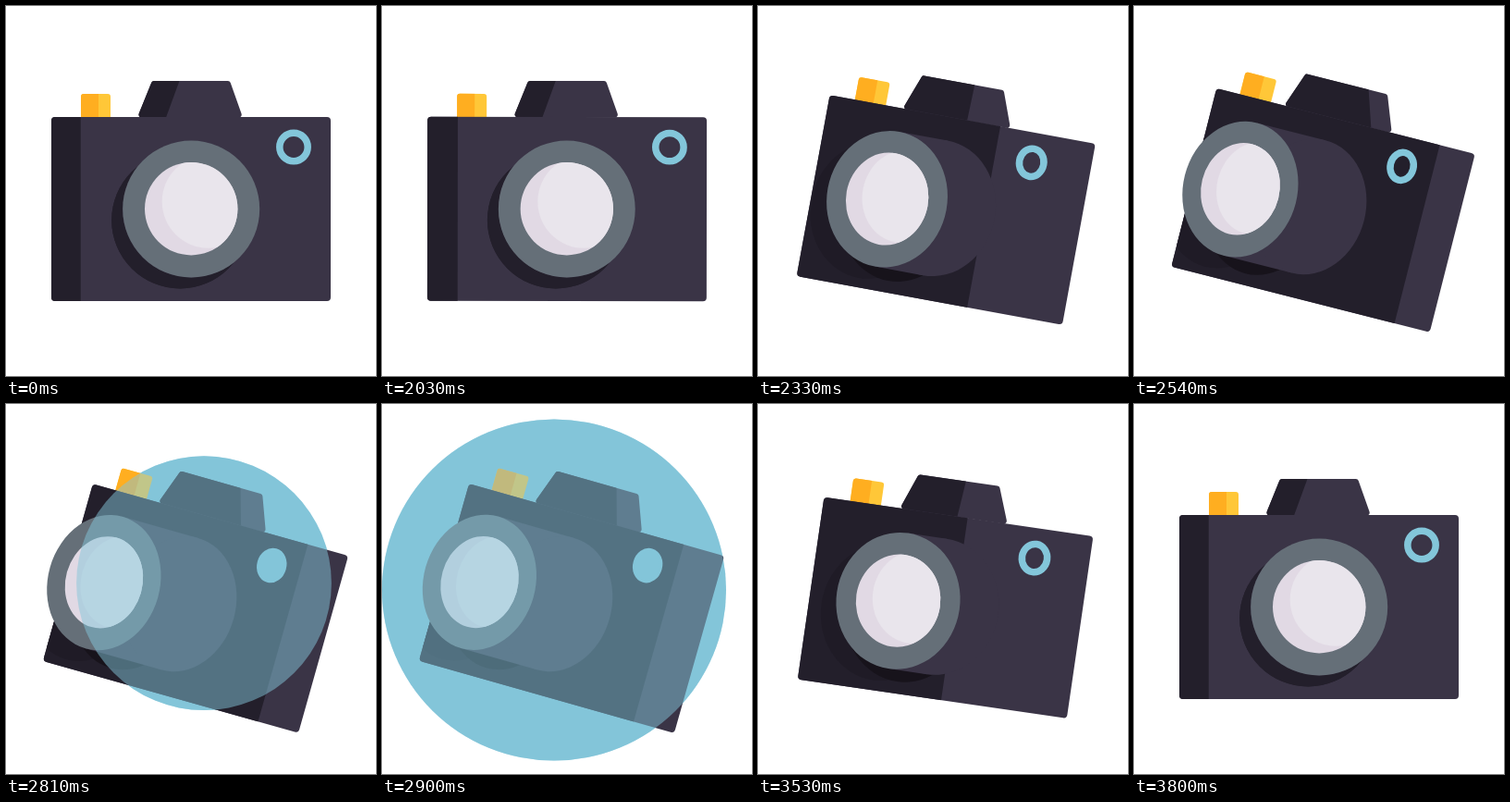
Write an HTML page with a canvas that moves like this. It is 400 by 400 pixels and loops after 3.83 s.

```html
<!DOCTYPE html>
<html>
<head>
<meta charset="utf-8">
<title>Camera</title>
<style>
html, body { margin: 0; width: 100%; height: 100%; overflow: hidden; background: #fff; }
canvas { display: block; width: 100vw; height: 100vh; }
</style>
</head>
<body>
<canvas id="stage" width="400" height="400"></canvas>
<script>
const ctx = document.getElementById('stage').getContext('2d');
const LOOP = 3830, START = 2000, HALF = 900, STEP = 30;
const LIGHT = [58, 52, 70], DARK = [35, 31, 43], BLUE = '#83c6da';

const mix = (a, b, k) => a + (b - a) * k;
const clamp = x => Math.max(0, Math.min(1, x));
const smooth = x => x * x * (3 - 2 * x);
const rgb = c => `rgb(${c.map(Math.round)})`;
const blend = (a, b, k) => rgb(a.map((v, i) => mix(v, b[i], k)));

// cubic-bezier(.31, 0, .13, 1)
function ease(x) {
  let lo = 0, hi = 1, s = 0.5;
  for (let i = 0; i < 24; i++) {
    s = (lo + hi) / 2;
    const at = 3 * s * (1 - s) * (1 - s) * 0.31 + 3 * s * s * (1 - s) * 0.13 + s * s * s;
    if (at < x) lo = s; else hi = s;
  }
  return smooth(s);
}

// values at rest, at the two middle poses and fully turned
const STOPS = [0, 0.663, 0.89, 1];
function key(p, ...v) {
  let i = 0;
  while (i < 2 && p > STOPS[i + 1]) i++;
  return mix(v[i], v[i + 1], (p - STOPS[i]) / (STOPS[i + 1] - STOPS[i]));
}

function poly(color, pts, r = 0) {
  const n = pts.length, [ax, ay] = pts[0], [bx, by] = pts[n - 1];
  ctx.beginPath();
  ctx.moveTo((ax + bx) / 2, (ay + by) / 2);
  pts.forEach((pt, i) => ctx.arcTo(...pt, ...pts[(i + 1) % n], r));
  ctx.closePath();
  ctx.fillStyle = color;
  ctx.fill();
}

function oval(color, x, y, rx, ry) {
  ctx.beginPath();
  ctx.ellipse(x, y, rx, ry, 0, 0, Math.PI * 2);
  ctx.fillStyle = color;
  ctx.fill();
}

const box = (l, t, r, b) => [[l, t], [r, t], [r, b], [l, b]];

function drawButton(p) {
  const l = mix(-119, -118, p), r = mix(-87, -83, p), split = mix(-100, -97, p);
  poly('#ffc738', box(l, -124.5, r, -92), 3);
  ctx.save();
  ctx.clip();
  ctx.fillStyle = '#ffae20';
  ctx.fillRect(l - 1, -126, split - l + 1, 40);
  ctx.restore();
}

function drawPrism(p) {
  const low = -99;
  poly(rgb(LIGHT), [
    [mix(-58, -70, p), low], [mix(-42, -56, p), -138.5],
    [mix(42, 36, p), -138.5], [mix(56, 51, p), low]
  ], 3);
  ctx.save();
  ctx.clip();
  poly(rgb(DARK), [
    [-90, low], [-90, -140], [key(p, -12, 6.3, 15.5, 10.8), -140],
    [key(p, -27, 5.3, 29, 22.7), low]
  ]);
  ctx.restore();
}

function drawBody(p, lens) {
  const half = mix(151, 143.4, p);
  const edge = -half + 2 * half * key(p, 0.105, 0.647, 0.866, 0.841);
  poly(rgb(LIGHT), box(-half, -99.5, half, 99.5), 4);
  ctx.save();
  ctx.clip();
  ctx.fillStyle = rgb(DARK);
  ctx.fillRect(-half - 1, -101, edge + half + 1, 202);
  const deep = clamp(p * 2);
  oval(blend(DARK, [31, 27, 38], deep), lens.x - 12 - 5 * p, 12 + 5 * p, lens.rx, 74);
  oval(blend(DARK, [23, 19, 27], deep), lens.x - 12 + 44 * p, 12 + p, lens.rx, 74);
  ctx.restore();
}

function drawLens(p, lens) {
  const base = -18 * p, body = rgb(LIGHT);
  ctx.fillStyle = body;
  ctx.fillRect(lens.x, -74, base - lens.x, 148);
  oval(body, base, 0, lens.rx, 74);
  oval('#656f78', lens.x, 0, lens.rx, 74);
  const rx = mix(50.2, 41.5, p);
  oval('#e1d9e4', lens.x, -0.3, rx, 50.2);
  ctx.save();
  ctx.clip();
  oval('#e9e5ec', lens.x + mix(18.7, 16, p), mix(-8, -5, p), rx, 50.2);
  ctx.restore();
}

function drawRing(p, x, fill) {
  const rx = mix(15.2, 12.2, p);
  ctx.beginPath();
  ctx.ellipse(x, -67, rx, 15.2, 0, 0, Math.PI * 2);
  ctx.lineWidth = 7.5;
  ctx.strokeStyle = BLUE;
  ctx.stroke();
  ctx.globalAlpha = fill;
  ctx.fillStyle = BLUE;
  ctx.fill();
  ctx.globalAlpha = 1;
}

function draw(time) {
  const t = time < START + STEP ? 0
    : STEP * Math.floor((time - START) / STEP);
  // out and back again
  const u = clamp(1 - Math.abs(t / HALF - 1));
  const p = u > 0 ? ease(u) : 0;
  const ms = u * HALF;
  const grow = smooth(clamp((ms - 640) / 260));
  const fill = clamp((ms - 590) / 110);

  const cx = mix(200, 205, p), cy = mix(219.5, 221, p);
  const turn = 15.8 * p * Math.PI / 180;
  const ringX = mix(111, 66.4, p);
  const cos = Math.cos(turn), sin = Math.sin(turn);
  const lens = { x: key(p, 0.2, -65.4, -91.2, -103.5), rx: mix(74, 60.5, p) };
  const flash = () => oval(BLUE,
    mix(cx + ringX * cos + 67 * sin, 186, grow),
    mix(cy + ringX * sin - 67 * cos, 201, grow),
    mix(12, 186, grow), mix(14, 184.5, grow));

  ctx.fillStyle = '#fff';
  ctx.fillRect(0, 0, 400, 400);
  if (grow > 0) flash();

  ctx.save();
  ctx.translate(cx, cy);
  ctx.rotate(turn);
  drawButton(p);
  drawPrism(p);
  drawBody(p, lens);
  drawLens(p, lens);
  drawRing(p, ringX, fill);
  ctx.restore();

  if (grow > 0) {
    ctx.globalAlpha = 0.5;
    flash();
    ctx.globalAlpha = 1;
  }
}

const begin = performance.now();
function tick() {
  draw((performance.now() - begin) % LOOP);
  requestAnimationFrame(tick);
}
tick();
</script>
</body>
</html>
```
